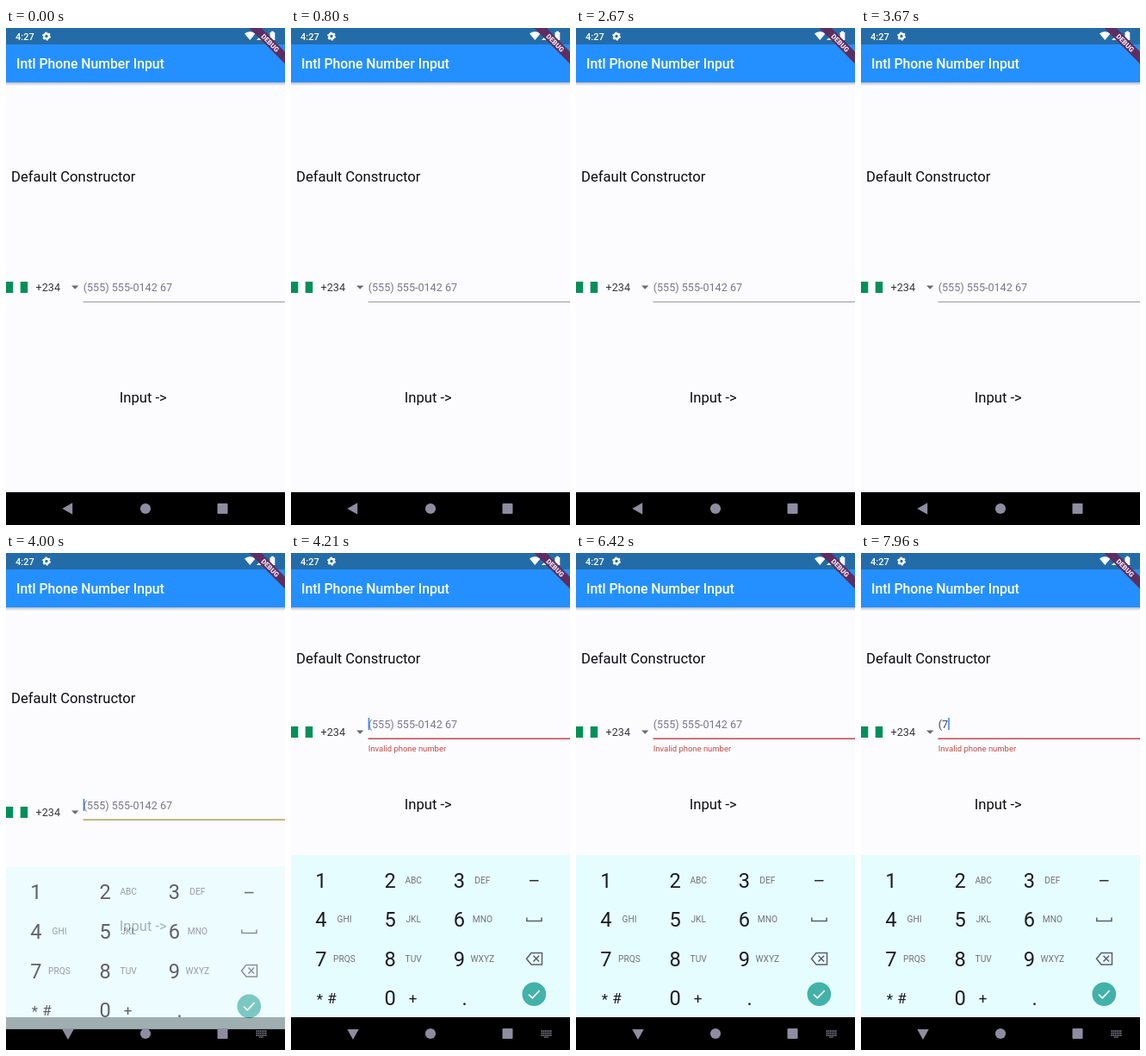
Animation, 324 px wide and 576 px high, one loop 8 s. Source, as an HTML page:

```html
<!DOCTYPE html>
<html lang="en">
<head>
<meta charset="utf-8">
<title>Phone number input</title>
<style>
  html, body { margin: 0; width: 100%; height: 100%; overflow: hidden; background: #fcfcff; }
  svg { display: block; width: 100vw; height: 100vh; font-family: Roboto, sans-serif; }
  .head { font-size: 16.6px; fill: #0c0c10; }
  .field { font-size: 12.6px; }
  .digit { font-size: 23.6px; fill: #1c1c24; text-anchor: middle; }
  .abc { font-size: 10.2px; fill: #70707e; text-anchor: middle; }
  .sym { font-size: 17px; fill: #1c1c24; text-anchor: middle; }
  .line { fill: none; stroke: #5c5c74; stroke-width: 1.5; }
</style>
</head>
<body>
<svg viewBox="0 0 324 576" preserveAspectRatio="none">
  <defs>
    <linearGradient id="shade" x2="0" y2="1">
      <stop offset="0" stop-color="#b4bccc"/>
      <stop offset="1" stop-color="#fcfcff"/>
    </linearGradient>
  </defs>
  <rect width="324" height="576" fill="#fcfcff"/>

  <!-- form -->
  <text id="title" class="head" x="6">Default Constructor</text>
  <g id="row">
    <rect y="-6" width="25" height="13" fill="#fff"/>
    <path d="M0-6h8.3v13h-8.3zM16.7-6h8.5v13h-8.5z" fill="#009058"/>
    <text class="field" x="34.6" y="4.5" fill="#34343c">+234</text>
    <path d="M76-1.5h8.4l-4.2 4.2z" fill="#6c6c70"/>
  </g>
  <g id="field">
    <text id="hint" class="field" x="89.7" y="4.5" fill="#7a7690">(555) 555-0142 67</text>
    <text id="typed" class="field" x="89.7" y="4.5" fill="#44445c">(7</text>
    <rect id="caret" y="-7" width="1.6" height="14" fill="#4285f4"/>
    <rect id="rule" x="89.5" width="234.5"/>
    <text id="error" x="89.7" y="32" font-size="9.46" fill="#c84a42">Invalid phone number</text>
  </g>
  <text id="input" class="head" x="131.8">Input -&gt;</text>

  <!-- app bar -->
  <rect y="63" width="324" height="4" fill="url(#shade)"/>
  <rect width="324" height="63" fill="#2490ff"/>
  <rect width="324" height="19" fill="#246ca8"/>
  <text x="12" y="47" font-size="15.76" font-weight="500" fill="#fff">Intl Phone Number Input</text>
  <g fill="#fff">
    <text x="11" y="13.6" font-size="11" font-weight="500">4:27</text>
    <circle cx="47" cy="9.5" r="2.8" fill="none" stroke="#fff" stroke-width="2.2"/>
    <circle cx="47" cy="9.5" r="4.2" fill="none" stroke="#fff" stroke-width="1.5" stroke-dasharray="2.2"/>
    <path d="M277 6.5q6.3-4.6 12.6 0l-6.3 7.5z"/>
    <path d="M291 14l10-10v10z"/>
    <path d="M306.5 5h1.4v-1.2h3v1.2h1.4v9h-5.8z"/>
  </g>
  <g transform="translate(324 0) rotate(45)">
    <rect x="-32" y="19.4" width="64" height="10" fill="#5c2e62"/>
    <text y="27.2" font-size="8" font-weight="900" fill="#f4e8f0" text-anchor="middle">DEBUG</text>
  </g>

  <!-- keypad and navigation bar -->
  <rect y="538" width="324" height="38"/>
  <g id="pad">
    <rect y="350" width="324" height="188" fill="#e6fdff"/>
    <g id="keys"></g>
    <text class="sym" x="33.5" y="523">*</text>
    <text class="sym" x="47.5" y="522">#</text>
    <text class="sym" x="141.5" y="522">+</text>
    <text class="digit" x="201.5" y="524">.</text>
    <path class="line" d="M277 379.7h10.5" style="stroke:#2c2c38"/>
    <path class="line" d="M273.8 422.5v4h17.2v-4"/>
    <path class="line" d="M279 463.5h12.5v13.5H279l-5.5-6.7zM281.5 466.7l6.6 6.8m0-6.8l-6.6 6.8"/>
    <circle cx="282.3" cy="511.3" r="13.8" fill="#42b2a8"/>
    <path class="line" d="M276 511.6l4.3 4.3 8.3-8.8" style="stroke:#fff;stroke-width:1.7"/>
  </g>
  <g fill="#8e8ca0">
    <path id="back"/>
    <circle cx="162" cy="557" r="6.1"/>
    <rect x="245.5" y="551" width="12" height="12" rx="1"/>
    <path id="switcher" d="M290.5 554h12M290.5 556.5h12M290.5 559h12M294 561.2h5" fill="none" stroke="#8e8ca0" stroke-width="1.3" stroke-dasharray="1.5 .6"/>
  </g>
</svg>
<script>
const LOOP = 8000;
const FOCUS = 3860, SHOW = 3920, INVALID = 3990, RESIZE = 4090, TYPE = 7760;
const GRAY = [154, 154, 158], OLIVE = [176, 176, 100], RED = [200, 80, 88];

// baselines or centres of each part: idle, with error, above the keypad
const LAYOUTS = [
  { title: 178, row: 300, field: 300, input: 434 },
  { title: 174, row: 300, field: 292, input: 438 },
  { title: 127.5, row: 207, field: 198, input: 297 }
];

const $ = id => document.getElementById(id);
const set = (id, attrs) => {
  for (const key in attrs) $(id).setAttribute(key, attrs[key]);
};
const ramp = (t, start, length) => Math.min(1, Math.max(0, (t - start) / length));
const mix = (a, b, k) => a.map((v, i) => v + (b[i] - v) * k);
const shift = y => `translate(0 ${y})`;

const letters = ['', 'ABC', 'DEF', 'GHI', 'JKL', 'MNO', 'PRQS', 'TUV', 'WXYZ'];
const key = (digit, x, y, abc = '') =>
  `<text class="digit" x="${x}" y="${y}">${digit}</text>` +
  `<text class="abc" x="${x + 27}" y="${y - 5}">${abc}</text>`;
$('keys').innerHTML = letters
  .map((abc, i) => key(i + 1, 35 + i % 3 * 80.2, 387.6 + Math.floor(i / 3) * 45.6, abc))
  .join('') + key(0, 115.2, 524.4);

function draw(t) {
  const at = LAYOUTS[t >= RESIZE ? 2 : t >= INVALID ? 1 : 0];
  set('title', { y: at.title });
  set('input', { y: at.input });
  set('row', { transform: shift(at.row) });
  set('field', { transform: shift(at.field) });

  const typed = t >= TYPE;
  const blinkFrom = typed ? TYPE : FOCUS;
  const caretOn = t >= FOCUS && (t - blinkFrom) % 1000 < 500;
  set('hint', { opacity: 1 - ramp(t, TYPE, 60) });
  set('typed', { opacity: +typed });
  set('caret', { x: typed ? 101.2 : 89.6, opacity: +caretOn });

  const focus = ramp(t, FOCUS, 120), bad = ramp(t, INVALID, 167);
  const color = mix(mix(GRAY, OLIVE, focus), RED, bad).map(Math.round);
  set('rule', { y: 17 - focus * 0.6, height: 1 + focus * 0.6, fill: `rgb(${color})` });
  set('error', { opacity: bad * bad });

  const shown = 1 - (1 - ramp(t, SHOW, 250)) ** 3;
  set('pad', { transform: shift(45 * (1 - shown)), opacity: shown });
  const open = t >= SHOW;
  set('back', { d: open ? 'M65.3 552h13.4L72 564z' : 'M65.3 557l11.9-6.8v13.6z' });
  set('switcher', { opacity: +open });
}

const begin = performance.now();
function tick() {
  draw((performance.now() - begin) % LOOP);
  requestAnimationFrame(tick);
}
tick();
</script>
</body>
</html>
```
